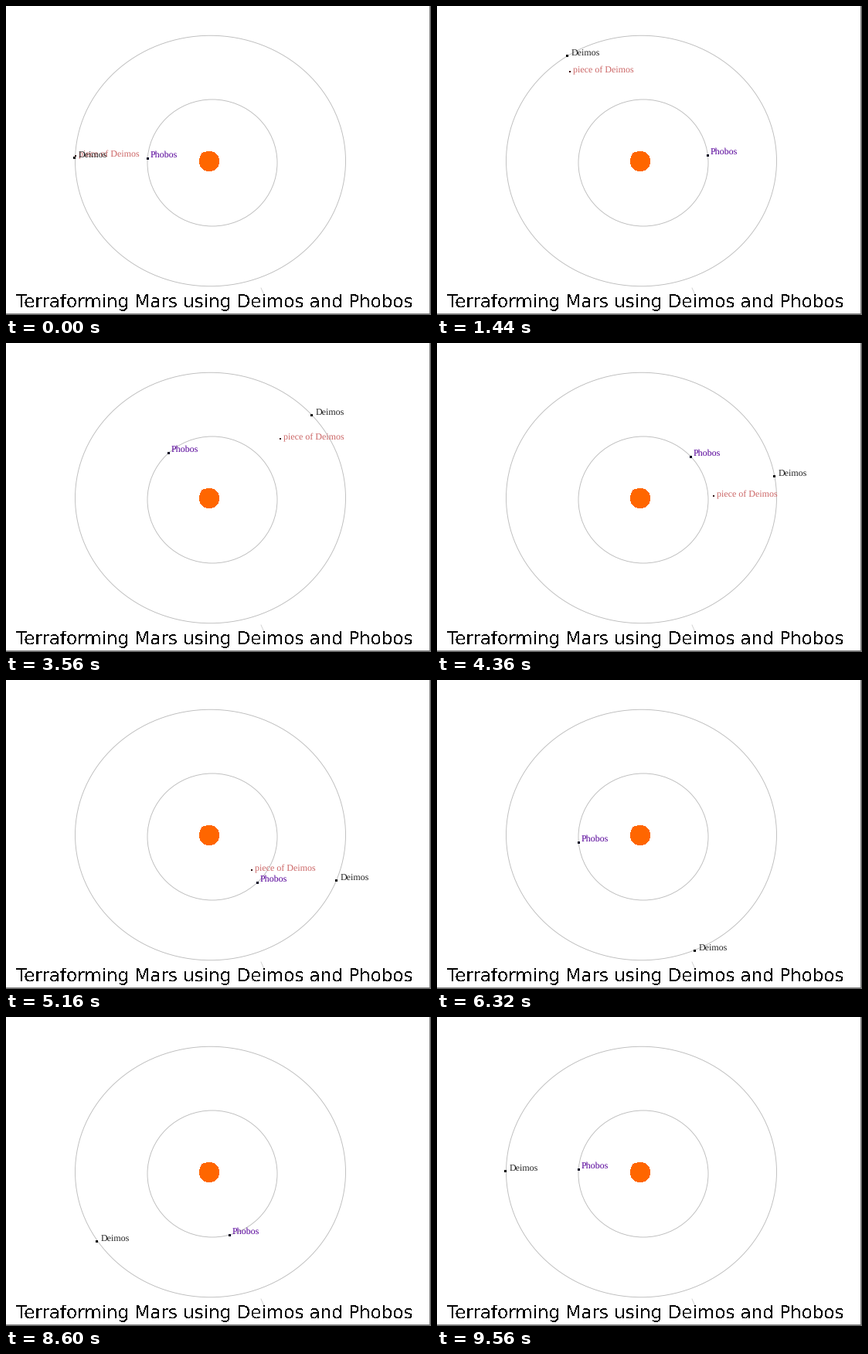
Animation of 550 by 400 pixels, one loop 9.6 s. Source, as a matplotlib script:

```python
import numpy as np
import matplotlib.pyplot as plt
from matplotlib.animation import FuncAnimation
from matplotlib.patches import Circle, Ellipse, Polygon, Rectangle

W, H = 550, 400
FRAMES, INTERVAL = 240, 40
IMPACT = 134  # last step on which the piece is visible

# Angles run in degrees, clockwise from the left; each key is (step, value)
DEIMOS_KEYS = [(0, 1.5), (89, 138.7), (158, 246.5), (239, 360.5)]
PHOBOS_KEYS = [(0, 4), (36, 173), (89, 408), (158, 715), (239, 1084)]
PIECE_RADIUS_KEYS = [(0, 174), (36, 147), (89, 118), (129, 71)]

plt.rcParams["text.hinting"] = "none"
fig = plt.figure(figsize=(W / 72, H / 72), dpi=72, facecolor="white")
ax = fig.add_axes([0, 0, 1, 1])
ax.set_xlim(0, W)
ax.set_ylim(H, 0)
ax.axis("off")


def tween(i, keys):
    steps, values = zip(*keys)
    return np.interp(i, steps, values)


def on_orbit(cx, cy, rx, ry, degrees):
    a = np.radians(degrees)
    return cx - rx * np.cos(a), cy - ry * np.sin(a)


def deimos_at(i):
    return on_orbit(263.5, 200.5, 175.5, 162.5, tween(i, DEIMOS_KEYS))


def phobos_at(i):
    return on_orbit(266.5, 203, 84, 82, tween(i, PHOBOS_KEYS))


def piece_at(i):
    """Inward spiral that turns faster and faster."""
    r = tween(i, PIECE_RADIUS_KEYS)
    return on_orbit(264, 200, r, r, 2 + 1.24 * i + 0.0035 * i ** 2)


class Body:
    """A dot with a label that travels along with it."""

    def __init__(self, name, color, dot_color, size, dx, dy, place, z):
        self.place, self.size, self.dx, self.dy = place, size, dx, dy
        self.dot = ax.add_patch(Rectangle((0, 0), size, size, fc=dot_color,
                                          lw=0, antialiased=False, zorder=z))
        self.label = ax.text(0, 0, name, color=color, fontsize=12,
                             family="Liberation Serif", va="baseline",
                             zorder=z)

    def move(self, i):
        x, y = np.round(self.place(i))
        self.dot.set_xy((x - self.size // 2, y - self.size // 2))
        self.label.set_position((x + self.dx, y + self.dy))

    def show(self, visible):
        self.dot.set_visible(visible)
        self.label.set_visible(visible)


# Orbits and the short stray stroke
for center, width, height in [((264.5, 200.5), 350, 324.5),
                              ((267, 203), 168, 164)]:
    ax.add_patch(Ellipse(center, width, height, fill=False, ec="#bcbcbc",
                         lw=0.9))
ax.plot([330, 334], [365, 374], color="#cccccc", lw=0.8)

# Mars, with its small corner at the upper left
ax.add_patch(Circle((263, 201), 12.6, fc="#ff6600", lw=0, antialiased=False))
ax.add_patch(Polygon([(251.5, 197), (253.5, 190.5), (259, 189), (263, 201)],
                     fc="#ff6600", lw=0, antialiased=False))

# Right and bottom edges
for xy, w, h in [((548, 0), 2, H), ((0, 398), W, 2)]:
    ax.add_patch(Rectangle(xy, w, h, fc="#707070", lw=0, antialiased=False))

ax.text(13, 390, "Terraforming Mars using Deimos and Phobos", fontsize=23,
        family="DejaVu Sans", color="black", va="baseline", antialiased=False)

piece = Body("piece of Deimos", "#cc6666", "#330000", 2, 4, 1, piece_at, 4)
deimos = Body("Deimos", "#222222", "black", 3, 6, 1, deimos_at, 5)
phobos = Body("Phobos", "#550099", "#000022", 3, 4, -1, phobos_at, 5)
bodies = [piece, deimos, phobos]


def draw(i):
    for body in bodies:
        body.move(i)
    piece.show(i <= IMPACT)
    return [part for b in bodies for part in (b.dot, b.label)]


anim = FuncAnimation(fig, draw, frames=FRAMES, interval=INTERVAL, repeat=True,
                     repeat_delay=0)
plt.show()
```
